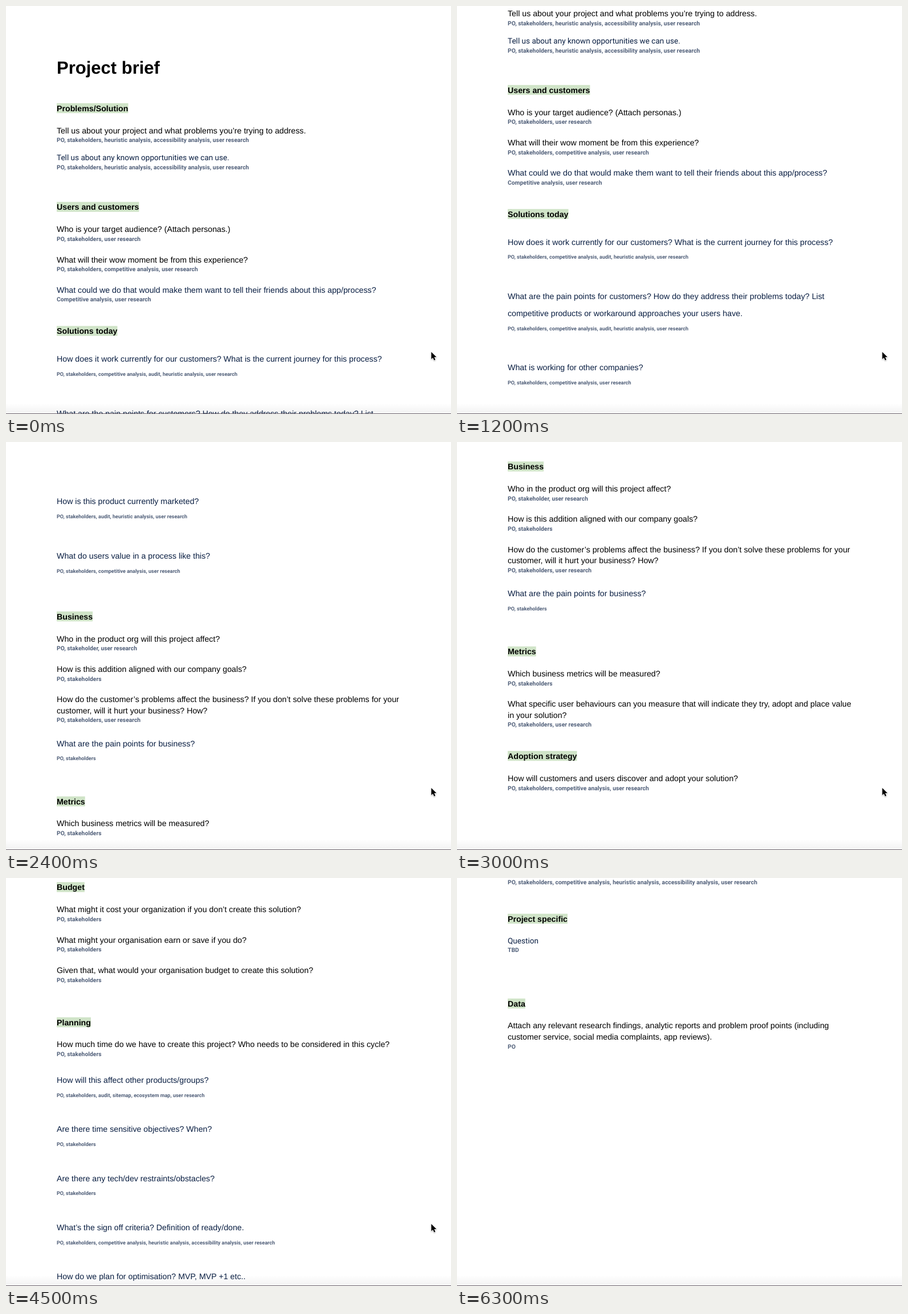
These frames come from a looping animation (781 px wide and 717 px high, 7.2 s). An HTML page:

```html
<!DOCTYPE html>
<html lang="en">
<head>
<meta charset="utf-8">
<title>Project brief</title>
<style>
  html, body { margin: 0; width: 100%; height: 100%; overflow: hidden; background: #fff; }
  svg { display: block; width: 781px; height: 717px; }
  text { font-family: "Liberation Sans", Arial, sans-serif; font-size: 14.21px; text-rendering: geometricPrecision; }
  .title { font-size: 31px; font-weight: 700; }
  .heading { font-weight: 700; }
  .navy, .roboto { fill: #091e42; }
  .roboto { font-family: Roboto, sans-serif; font-size: 13.56px; }
  .tight, .loose { font-family: Roboto, sans-serif; font-weight: 700; fill: #505f79; }
  .tight { font-size: 10.33px; }
  .loose { font-size: 9.04px; }
</style>
</head>
<body>
<svg id="stage" viewBox="0 0 781 717">
  <defs>
    <linearGradient id="gap" x2="0" y2="1">
      <stop offset="0" stop-color="#e4e6e9"/>
      <stop offset=".12" stop-color="#d3d6da"/>
      <stop offset=".35" stop-color="#eef0f2"/>
      <stop offset=".6" stop-color="#f7f8fa"/>
      <stop offset=".85" stop-color="#f3f4f6"/>
      <stop offset="1" stop-color="#e6e8eb"/>
    </linearGradient>
    <linearGradient id="shade" x2="0" y2="1">
      <stop offset="0" stop-color="#000" stop-opacity="0"/>
      <stop offset="1" stop-color="#000" stop-opacity=".05"/>
    </linearGradient>
    <filter id="soft" x="-50%" y="-50%" width="200%" height="200%">
      <feDropShadow dx="0" dy="1" stdDeviation=".9" flood-opacity=".35"/>
    </filter>
  </defs>
  <g id="page"></g>
  <rect y="698" width="781" height="18" fill="url(#shade)"/>
  <rect y="716" width="781" height="1" fill="#6f666f"/>
  <path id="cursor" filter="url(#soft)" transform="translate(746.4 608)" stroke="#fff" stroke-width="1" paint-order="stroke"
    d="M0 0V12.6L2.9 9.9L4.9 14.6L7.1 13.7L5.1 9.1H9Z"/>
</svg>
<script>
const page = document.getElementById('page');
const cursor = document.getElementById('cursor');
const LEFT = 89;

function add(tag, attributes, content = '') {
  const node = document.createElementNS('http://www.w3.org/2000/svg', tag);
  for (const key in attributes) node.setAttribute(key, attributes[key]);
  node.textContent = content;
  return page.appendChild(node);
}

const write = (style, baseline, content) =>
  add('text', { x: LEFT, y: baseline, class: style }, content);

function heading(y, content) {
  const mark = add('rect', { x: LEFT, y: y - 9.2, height: 17.4, fill: '#d0e4c8' });
  const label = write('heading', y + 4.8, content);
  mark.setAttribute('width', label.getComputedTextLength());
}

// Each letter of a source code stands for one listed source.
const SOURCES = {
  p: 'PO', s: 'stakeholders', o: 'stakeholder', c: 'competitive analysis', C: 'Competitive analysis',
  h: 'heuristic analysis', x: 'accessibility analysis', a: 'audit', m: 'sitemap',
  e: 'ecosystem map', u: 'user research', t: 'TBD'
};

function question(style, y, content, codes, spacing = 'tight') {
  write(style, y + 4.7, content);
  if (!codes) return;
  const baseline = y + (spacing === 'tight' ? 20.4 : 29.2);
  write(spacing, baseline, [...codes].map(code => SOURCES[code]).join(', '));
}

const black = (...rest) => question('black', ...rest);
const navy = (...rest) => question('navy', ...rest);
const roboto = (...rest) => question('roboto', ...rest);
const loose = (y, content, codes) => navy(y, content, codes, 'loose');

for (const y of [1019, 2051.5, 3084])
  add('rect', { x: 0, y, width: 781, height: 10, fill: 'url(#gap)' });

write('title', 119, 'Project brief');

heading(180, 'Problems/Solution');
black(219, 'Tell us about your project and what problems you’re trying to address.', 'pshxu');
roboto(266.7, 'Tell us about any known opportunities we can use.', 'pshxu');

heading(353.5, 'Users and customers');
black(392.5, 'Who is your target audience? (Attach personas.)', 'psu');
black(446, 'What will their wow moment be from this experience?', 'pscu');
navy(499, 'What could we do that would make them want to tell their friends about this app/process?', 'Cu');

heading(571.5, 'Solutions today');
loose(620.3, 'How does it work currently for our customers? What is the current journey for this process?', 'pscahu');
navy(716.2, 'What are the pain points for customers? How do they address their problems today? List');
loose(745.8, 'competitive products or workaround approaches your users have.', 'pscahu');
loose(841.2, 'What is working for other companies?', 'pscu');
loose(1141.5, 'How is this product currently marketed?', 'psahu');
loose(1237.3, 'What do users value in a process like this?', 'pscu');

heading(1344, 'Business');
black(1383, 'Who in the product org will this project affect?', 'pou');
black(1436.2, 'How is this addition aligned with our company goals?', 'ps');
black(1489.5, 'How do the customer’s problems affect the business? If you don’t solve these problems for your');
black(1509, 'customer, will it hurt your business? How?', 'psu');
loose(1567, 'What are the pain points for business?', 'ps');

heading(1669, 'Metrics');
black(1707.6, 'Which business metrics will be measured?', 'ps');
black(1761, 'What specific user behaviours can you measure that will indicate they try, adopt and place value');
black(1780.3, 'in your solution?', 'psu');

heading(1852.6, 'Adoption strategy');
black(1891.6, 'How will customers and users discover and adopt your solution?', 'pscu');

heading(2164.5, 'Budget');
black(2203.5, 'What might it cost your organization if you don’t create this solution?', 'ps');
black(2256.8, 'What might your organisation earn or save if you do?', 'ps');
black(2310.1, 'Given that, what would your organisation budget to create this solution?', 'ps');

heading(2402, 'Planning');
black(2440.7, 'How much time do we have to create this project? Who needs to be considered in this cycle?', 'ps');
loose(2503.7, 'How will this affect other products/groups?', 'psameu');
loose(2589.7, 'Are there time sensitive objectives? When?', 'ps');
loose(2676, 'Are there any tech/dev restraints/obstacles?', 'ps');
loose(2762.3, 'What’s the sign off criteria? Definition of ready/done.', 'pschxu');
loose(2848.5, 'How do we plan for optimisation? MVP, MVP +1 etc..', 'pscu');

heading(3226.2, 'Solution');
navy(3264.5, 'How will this solution affect the customer?', 'pschxu');

heading(3346, 'Project specific');
roboto(3384, 'Question', 't');

heading(3495, 'Data');
black(3533.7, 'Attach any relevant research findings, analytic reports and problem proof points (including');
black(3553.2, 'customer service, social media complaints, app reviews).', 'p');

// Scroll position for each step; the page jumps between them.
const LOOP = 7200, STEP = 300;
const SCROLL = [0, 0, 58, 169, 205.5, 423.5, 534, 950, 1037, 1240, 1300.5, 1522, 1608,
  1887.5, 1975, 2148, 2440, 2552, 2947.5, 3003.5, 3183.5, 3274];
const LAST = SCROLL.length - 1;

const start = performance.now();
function draw() {
  const step = Math.min(LAST, Math.floor((performance.now() - start) % LOOP / STEP));
  page.setAttribute('transform', `translate(0 ${-SCROLL[step]})`);
  cursor.setAttribute('visibility', step === LAST ? 'hidden' : 'visible');
  requestAnimationFrame(draw);
}
draw();
</script>
</body>
</html>
```
